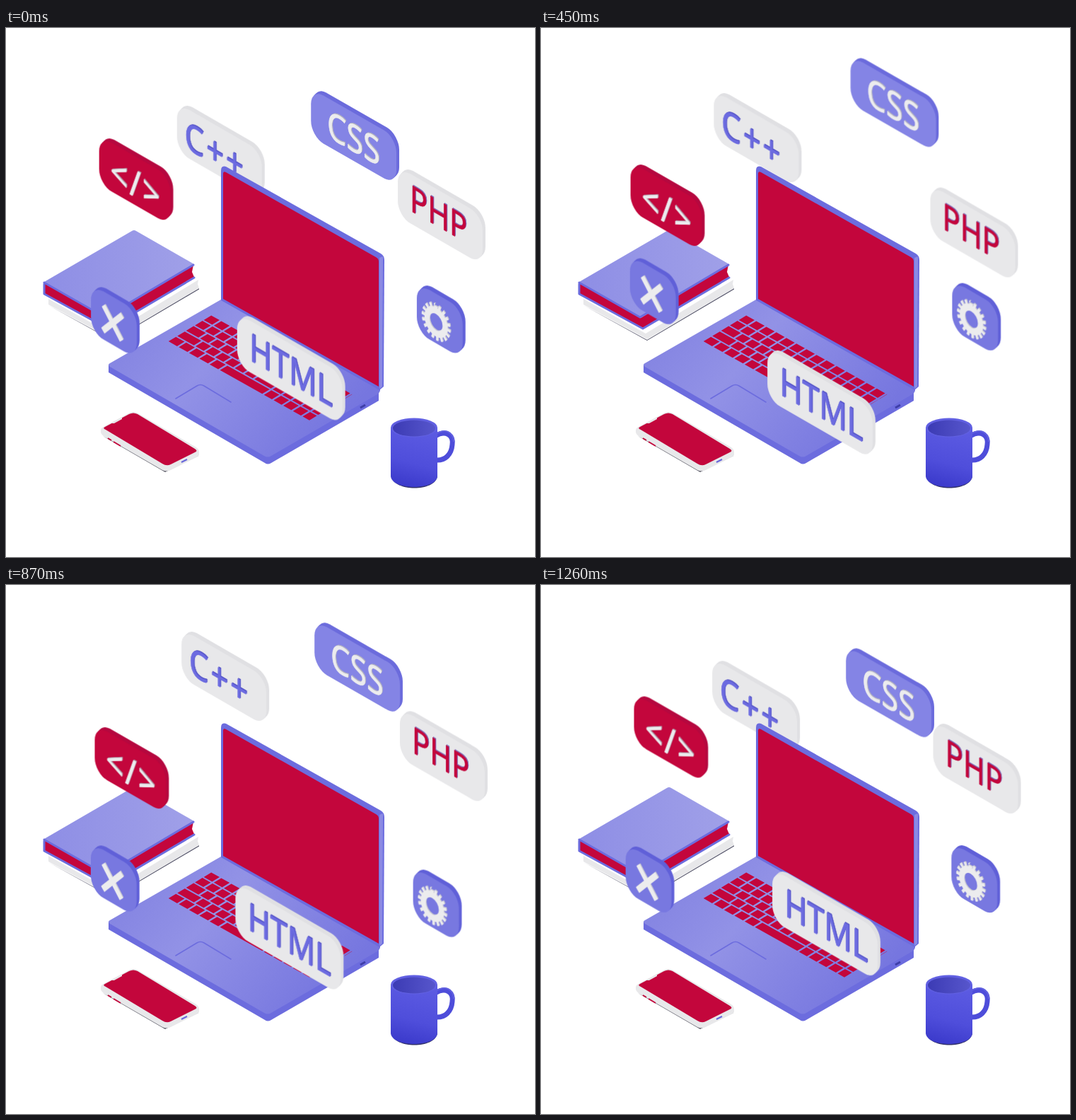
These frames come from a looping animation (748x748 px, 1.29 s). An HTML page without scripts:

```html
<!DOCTYPE html>
<html lang="en">
<head>
<meta charset="utf-8">
<title>Isometric developer desk</title>
<style>
  html, body { margin: 0; width: 100%; height: 100%; overflow: hidden; background: #fff; }
  svg { display: block; width: 100vw; height: 100vh; }

  .lav { fill: #8a8ae4; }
  .blue { fill: #6c6cde; }
  .red { fill: #c3063c; }
  .white { fill: #e8e8ea; }
  .line { fill: none; stroke: #6c6cde; stroke-width: 3; stroke-linejoin: round; stroke-linecap: round; }
  .thin { stroke-width: 1.6; }

  /* Opposite rotations cancel sideways motion and leave a pure cosine along (--dx, --dy). */
  .panel {
    --dx: -1.9px; --dy: 13.8px;
    animation: bob 1290ms steps(43) -2ms infinite;
  }
  @keyframes bob {
    from {
      transform: translate(var(--x), var(--y))
        rotate(var(--p)) translate(var(--dx), var(--dy))
        rotate(calc(-2 * var(--p))) translate(var(--dx), var(--dy)) rotate(var(--p));
    }
    to {
      transform: translate(var(--x), var(--y))
        rotate(calc(var(--p) + 360deg)) translate(var(--dx), var(--dy))
        rotate(calc(-2 * var(--p) - 720deg)) translate(var(--dx), var(--dy)) rotate(calc(var(--p) + 360deg));
    }
  }

  /* Extrusion towards the upper right */
  .slab { fill: var(--face); filter: drop-shadow(2.4px -1.4px 0 var(--side)) drop-shadow(2.4px -1.4px 0 var(--side)); }
  .mark {
    fill: var(--ink); stroke: var(--ink); stroke-width: .7; stroke-linejoin: round;
    filter: drop-shadow(1.6px -.6px 0 var(--shade));
  }
  .slab > *, .mark > * { transform: matrix(.8, .46, 0, 1, 0, 0); }
  .slab rect { rx: 22px; }
  text { font: 54px "Noto Sans", "Open Sans", sans-serif; text-anchor: middle; }
  .gear { fill: none; }

  .pale { --face: #e8e8ea; --side: #e0e0e3; --ink: #6c6be0; --shade: #4f4ec4; }
  .violet { --face: #8484e5; --side: #6b6bdc; --ink: #ececee; --shade: #b4b4bf; }
  .deep { --face: #7878e0; --side: #6060d8; --ink: #ececee; --shade: #c8c8d0; }
  .crimson { --face: #c3063c; --side: #b5083f; --ink: #ececee; --shade: #a999a6; }
  .php { --ink: #c3063c; --shade: #7d6bb8; }
</style>
</head>
<body>
<svg viewBox="0 0 748 748">
  <defs>
    <linearGradient id="deck" x1="0" x2="1" y1="0" y2=".5">
      <stop offset="0" stop-color="#7e7ee0"/><stop offset=".45" stop-color="#9292e6"/><stop offset="1" stop-color="#7676df"/>
    </linearGradient>
    <linearGradient id="cover" x1="0" x2="1">
      <stop offset="0" stop-color="#8e8ee5"/><stop offset="1" stop-color="#a0a0e8"/>
    </linearGradient>
    <linearGradient id="cup" x1=".6" x2=".4" y1="0" y2="1">
      <stop offset="0" stop-color="#5c5be2"/><stop offset=".6" stop-color="#4f4edb"/><stop offset="1" stop-color="#3b3acb"/>
    </linearGradient>
    <linearGradient id="hollow" x1="0" x2="1">
      <stop offset="0" stop-color="#3c3bb4"/><stop offset="1" stop-color="#5756cc"/>
    </linearGradient>
  </defs>

  <g id="books">
    <path fill="#55556a" d="M60 392 150 441 273 368V369.5L150 442Z"/>
    <path class="white" d="M60 383 148 432 272 356 271 362 273 368 150 440 60 391Z"/>
    <path class="red" d="M55 361 141 410 265 335 263 345 266 352 144 424 55 376Z"/>
    <path class="line" d="M54 362V376L144 425 266 353"/>
    <path fill="url(#cover)" d="M54 359 178 287Q181 285 184 287L266 334 140 408Z"/>
    <path class="line" d="M54 360 140 409 265 335"/>
  </g>

  <g class="panel pale" style="--x:244.7px;--y:86px;--p:-40deg;--dy:13px">
    <g class="slab"><rect width="150" height="69"/></g>
    <g class="mark"><text x="67" y="57" letter-spacing="4">C++</text></g>
  </g>

  <g id="laptop">
    <path class="blue" d="M145 476V487L366 615Q370 618 375 615L527 527V512L370 600Z"/>
    <path fill="url(#deck)" d="M147 474 304 384 529 507V513Q528 516 525 518L375 605Q370 608 365 605L147 479Q143 476 147 474Z"/>
    <path stroke="#3e3ea8" stroke-width="3" d="M501 537 508 533"/>
    <path class="line thin" d="M240 524 270 506Q275 503 280 506L318 529"/>
    <g transform="matrix(.866 .485 -.866 .525 291 406)" fill="none" stroke="#c3063c" stroke-width="12.2">
      <path stroke-dasharray="13.6 2.8" d="M0 7H230M0 21.4H230"/>
      <path stroke-dasharray="20 2.8 13.2 2.8 13.2 2.8 13.2 2.8 13.2 2.8 13.2 2.8 13.2 2.8" d="M0 35.8H230"/>
      <path stroke-dasharray="27 2.8 13.2 2.8 13.2 2.8 13.2 2.8 13.2 2.8 13.2 2.8 13.2 2.8" d="M0 50.2H230"/>
      <path stroke-dasharray="14 2.8 14 2.8 14 2.8 14 2.8 14 2.8 69 2.8 13 2.8 13 2.8 13 2.8 13 2.8 13 2.8" d="M0 64.6H230"/>
    </g>
    <path class="blue" d="M304 202Q304 194 311 196L530 319Q535 322 535 328L534 507 528 512 304 385Z"/>
    <path class="lav" d="M528 325 533 323 532 507 528 510Z"/>
    <path class="red" d="M307 206Q307 202 311 204L523 324Q527 326 527 330V507L307 383Z"/>
  </g>

  <g id="phone">
    <path fill="#50505c" d="M137 577 225 628 272 605V602L226 622Z"/>
    <path class="white" d="M134 569Q134 566 138 564L173 545Q180 541 187 545L269 593Q273 596 273 600V603Q273 605 269 607L233 625Q227 628 221 625L138 577Q134 574 134 571Z"/>
    <path class="red" d="M141 568Q136 566 140 564L174 546Q180 543 186 546L267 595Q272 598 267 600L233 617Q227 620 221 616Z"/>
    <path class="white" d="M149 559 164 550 164 553 153 559Z"/>
    <path stroke="#c3063c" stroke-width="2" d="M144 580 149 583M152 585 162 591"/>
    <path stroke="#6767da" stroke-width="2" d="M248 614 256 610"/>
  </g>

  <g id="mug">
    <path fill="none" stroke="#4e4dda" stroke-width="7" d="M607 577C622 568 633 576 631 589C630 603 621 612 608 611"/>
    <path fill="none" stroke="#6160e0" stroke-width="2" d="M608 574C621 566 633 571 633 585"/>
    <path fill="#33336a" d="M545 634C548 656 607 656 610 634Z"/>
    <path fill="url(#cup)" d="M544 565V634C546 654 608 654 610 634V565Z"/>
    <ellipse cx="577" cy="565" rx="33" ry="13.5" fill="#6160e2"/>
    <ellipse cx="577" cy="566" rx="30" ry="11.5" fill="url(#hollow)"/>
  </g>

  <g class="panel violet" style="--x:435px;--y:58px;--p:9deg">
    <g class="slab"><rect width="151" height="68"/></g>
    <g class="mark"><text x="75" y="55">CSS</text></g>
  </g>

  <g class="panel pale php" style="--x:553.7px;--y:198px;--p:-94deg">
    <g class="slab"><rect width="150" height="70"/></g>
    <g class="mark"><text x="72" y="52" style="font-size:52px">PHP</text></g>
  </g>

  <g class="panel crimson" style="--x:128px;--y:179px;--p:166deg">
    <g class="slab"><rect width="126" height="69"/></g>
    <g class="mark"><text x="65" y="58" letter-spacing="3">&lt;/&gt;</text></g>
  </g>

  <g class="panel deep" style="--x:122px;--y:349px;--p:61deg">
    <g class="slab"><rect width="81" height="68"/></g>
    <g class="mark"><path style="stroke-width:8" d="M22 20 54 55M55 19 21 56"/></g>
  </g>

  <g class="panel deep" style="--x:579.4px;--y:371px;--p:-247deg">
    <g class="slab"><rect width="81" height="70"/></g>
    <g class="mark">
      <g class="gear">
        <circle cx="34" cy="40" r="16" style="stroke-width:9"/>
        <circle cx="34" cy="40" r="22.5" pathLength="36" stroke-dasharray="1" style="stroke-width:6"/>
      </g>
    </g>
  </g>

  <g class="panel pale" style="--x:323.8px;--y:425.5px;--p:-143deg">
    <g class="slab"><rect width="186" height="73"/></g>
    <g class="mark"><text x="95" y="56">HTML</text></g>
  </g>
</svg>
</body>
</html>
```
